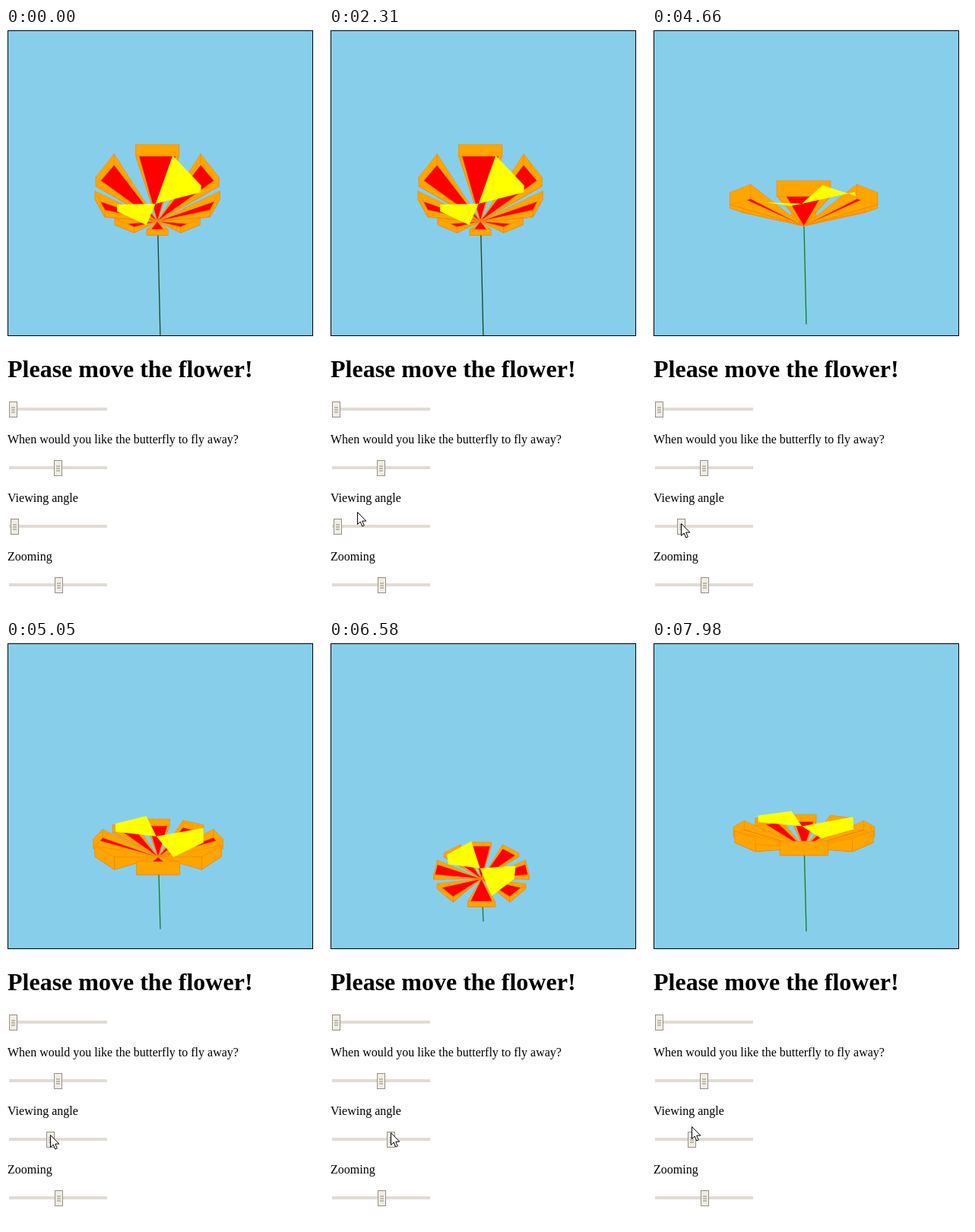
These frames come from a looping animation (417 px wide and 769 px high, 8000 ms). An HTML page:

```html
<!DOCTYPE html>
<html lang="en">
<head>
<meta charset="utf-8">
<title>Please move the flower!</title>
<style>
html, body { margin: 0; width: 100%; height: 100%; overflow: hidden; background: #fff; }
svg { display: block; width: 417px; height: 769px; }
text { font: 16px "Liberation Serif", "Times New Roman", serif; }
.title { font-size: 32px; font-weight: bold; }
</style>
</head>
<body>
<svg viewBox="0 0 417 769">
  <defs>
    <clipPath id="view"><rect x="3" y="4" width="400" height="400"/></clipPath>
    <g id="slot"><rect x="4" y="-2" width="129" height="4" fill="#e0dcd5"/></g>
    <g id="thumb">
      <rect x="-5" y="-10" width="10" height="20" fill="#f0ede5" stroke="#968f84"/>
      <path d="M-2.5 -2.5h5M-2.5 .5h5M-2.5 3.5h5" stroke="#8c857a"/>
    </g>
  </defs>
  <rect x="2.5" y="3.5" width="401" height="401" fill="#87ceeb" stroke="#000"/>
  <g id="scene" clip-path="url(#view)"></g>
  <text class="title" x="2" y="459">Please move the flower!</text>
  <text x="2" y="546">When would you like the butterfly to fly away?</text>
  <text x="2" y="623">Viewing angle</text>
  <text x="2" y="700">Zooming</text>
  <use href="#slot" y="501"/><use href="#thumb" x="9.5" y="501.5"/>
  <use href="#slot" y="578"/><use href="#thumb" x="68.5" y="578.5"/>
  <use href="#slot" y="655"/><use href="#thumb" id="angle" x="11.5" y="655.5"/>
  <use href="#slot" y="732"/><use href="#thumb" x="69.5" y="732.5"/>
  <path id="cursor" d="M0 0V16L3.7 12.5L6.3 18.5L8.8 17.4L6.2 11.6H11.3Z" fill="#fff" stroke="#000"/>
</svg>
<script>
const LOOP = 8000, TICK = 860 / 11, SYNC = 4190;
const SHOW = 630, GRAB = 3410, REST = 11;
const PETALS = 8, HALF = 0.25, LOW = 0.76, HIGH = 1.24;

// time, pointer x, pointer y
const path = [
  [630, 235, 752], [1240, 67, 578], [2010, 67, 581], [2230, 37, 636],
  [2710, 11, 651], [3410, 11, 652], [3580, 14, 653], [4190, 15, 653],
  [5050, 58, 649], [5590, 73, 647], [7240, 87, 645], [7940, 52, 638]
];

// slider, centre y, scale, perspective, tilt, rise
const views = [
  [11, 254, 75, 0.341, -0.54, 0.28],
  [15, 249, 79, 0.363, -0.49, 0.285],
  [26, 250, 90, 0.42, -0.35, 0.3],
  [52, 272, 85, 0.33, 0.31, 0.306],
  [58, 284, 78.6, 0.31, 0.443, 0.315],
  [87, 320, 55.5, 0.123, 0.73, 0.18]
];

// across, depth, height
const joint = [-0.03, 0, 1.1];
const wings = [
  [joint, [0.19, -0.866, 1.22], [0.67, -0.38, 1.21], [0.74, -0.08, 1.61]],
  [joint, [-0.73, 0.09, 1.25], [-0.8, 0.387, 1.45], [-0.255, 0.94, 1.495]]
];

const scene = document.getElementById("scene");
const angle = document.getElementById("angle");
const cursor = document.getElementById("cursor");

function add(tag, attrs) {
  const el = document.createElementNS("http://www.w3.org/2000/svg", tag);
  for (const k in attrs) el.setAttribute(k, attrs[k]);
  return scene.appendChild(el);
}
const orange = { fill: "#ffa500", stroke: "#f58a00", "stroke-width": 0.6, "stroke-linejoin": "round" };

const stem = add("line", { x2: 203, "stroke-width": 1.3 });
// each petal is an open wedge, listed from the far side to the near one
const petals = Array.from({ length: PETALS }, (_, i) => ({
  turn: Math.ceil(i / 2) * (i % 2 ? 1 : -1) * 2 * Math.PI / PETALS,
  floor: add("polygon", { fill: "#f00" }),
  sides: [add("polygon", orange), add("polygon", orange)],
  wall: add("polygon", orange)
}));
const wingEls = wings.map(() => add("polygon", { fill: "#ff0" }));

// linear interpolation in rows keyed by their first value
function sample(rows, key) {
  const first = rows[0][0], last = rows[rows.length - 1][0];
  const k = Math.min(last, Math.max(first, key));
  const i = Math.max(1, rows.findIndex(r => r[0] >= k));
  const a = rows[i - 1], b = rows[i];
  const f = (k - a[0]) / (b[0] - a[0]);
  return a.map((v, j) => v + (b[j] - v) * f);
}

function put(el, ...pts) {
  el.setAttribute("points", pts.map(p => p.map(v => v.toFixed(2)).join()).join(" "));
}

function drawFlower(pos) {
  const [, cy, scale, persp, tilt, rise] = sample(views, pos);
  const cx = 198.9 + 0.02 * pos, hub = [cx, cy];
  const project = ([x, u, v]) => {
    const s = scale / (1 + persp * u);
    return [cx + s * x, cy - s * (tilt * u + rise * v)];
  };

  for (const p of petals) {
    const s = Math.sin(p.turn), c = Math.cos(p.turn);
    const corner = (side, v) => project([s + side * HALF * c, c - side * HALF * s, v]);
    const [l0, l1, r0, r1] = [corner(-1, LOW), corner(-1, HIGH), corner(1, LOW), corner(1, HIGH)];
    put(p.floor, hub, l0, r0);
    put(p.sides[0], hub, l0, l1);
    put(p.sides[1], hub, r0, r1);
    put(p.wall, l0, l1, r1, r0);
  }
  wings.forEach((w, i) => put(wingEls[i], ...w.map(project)));

  const away = 89 - pos;
  stem.setAttribute("x1", cx + 0.3);
  stem.setAttribute("y1", cy);
  stem.setAttribute("y2", 366 + 0.33 * away + 0.0026 * away * away);
  stem.setAttribute("stroke", pos < 12 ? "#184818" : "#0a8020");
}

function frame() {
  const now = performance.now() % LOOP;
  const t = SYNC + Math.floor((now - SYNC) / TICK + 0.001) * TICK;
  const [, x, y] = sample(path, t).map(Math.round);
  const pos = t < GRAB ? REST : x;
  drawFlower(pos);
  angle.setAttribute("x", pos + 0.5);
  cursor.setAttribute("transform", `translate(${x + 0.5} ${y + 0.5})`);
  cursor.setAttribute("visibility", now < SHOW ? "hidden" : "visible");
  requestAnimationFrame(frame);
}
frame();
</script>
</body>
</html>
```
